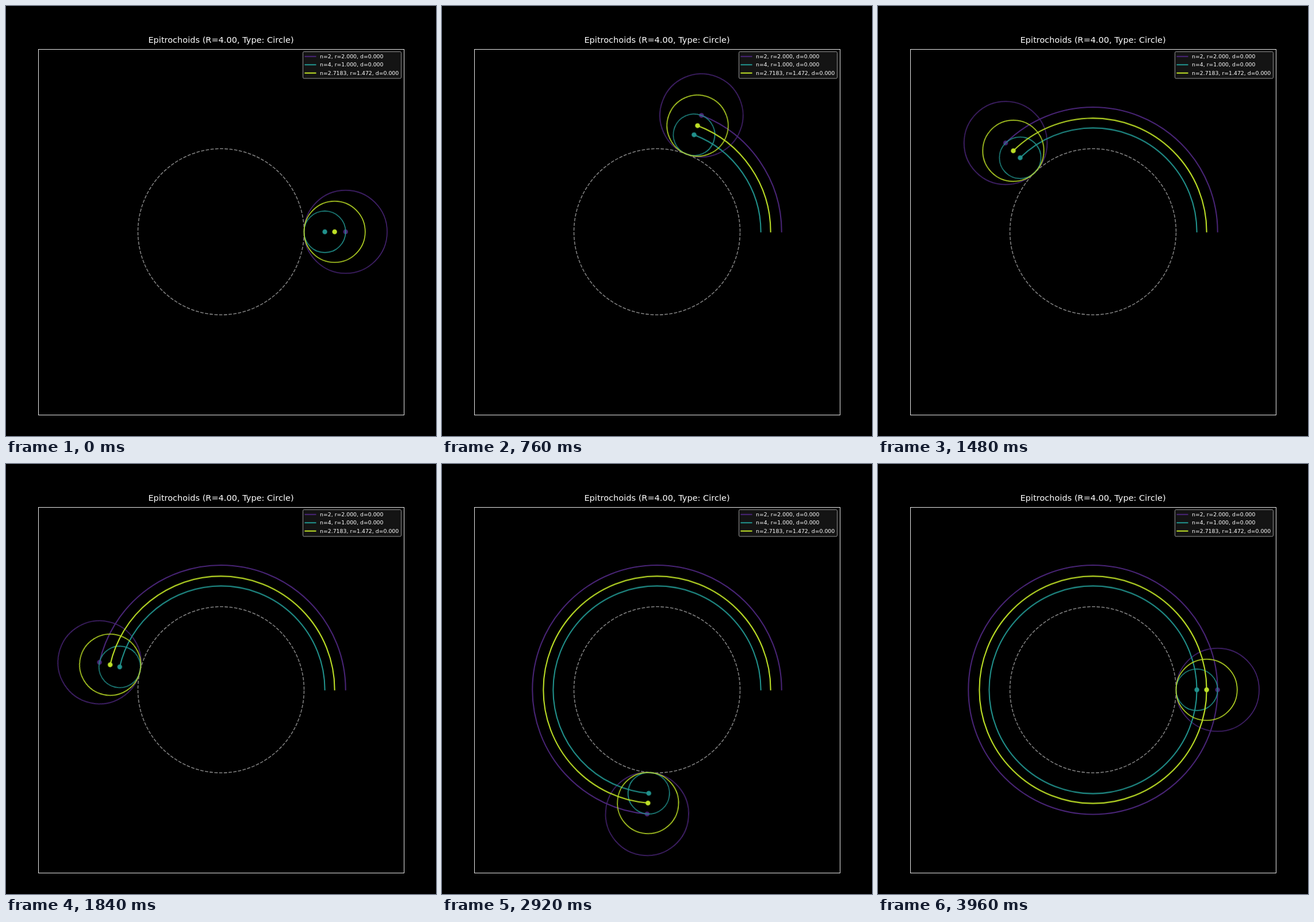
Write an HTML page that moves like this. It is 748 px wide and 748 px high and loops after 4 s.

```html
<!DOCTYPE html>
<html lang="en">
<head>
<meta charset="utf-8">
<title>Epitrochoids</title>
<style>
  html, body { margin: 0; width: 100%; height: 100%; overflow: hidden; background: #000; }
  svg { display: block; width: 748px; height: 748px; }
  text { fill: #fff; font-family: "DejaVu Sans", sans-serif; }
  .title { font-size: 14.54px; text-anchor: middle; }
  .legend text { font-size: 9.35px; }
  .legend line, .trail { stroke-width: 2.08; stroke-linecap: square; }
  .base, .wheel { fill: none; stroke-width: 1.56; }
  .base { stroke: #808080; stroke-dasharray: 5.77 2.49; }
  .trail { fill: none; stroke-dasharray: 1 2; }
  /* 100 poses, with both ends of the turn included */
  .trail, .arm { animation: 4s steps(100, jump-none) infinite; }
  .trail { animation-name: draw; }
  .arm { animation-name: turn; }
  @keyframes draw { from { stroke-dashoffset: 1; } to { stroke-dashoffset: 0; } }
  @keyframes turn { from { transform: rotate(0deg); } to { transform: rotate(360deg); } }
</style>
</head>
<body>
<svg viewBox="0 0 748 748">
  <rect width="748" height="748"/>
  <g id="plot" transform="translate(374 392.75) scale(1 -1)">
    <circle class="base" r="144.5"/>
  </g>
  <rect x="56.5" y="75.5" width="636" height="636" fill="none" stroke="#fff" stroke-width=".9"/>
  <text class="title" x="374" y="64.3">Epitrochoids (R=4.00, Type: Circle)</text>
  <g class="legend" id="legend">
    <rect x="516.5" y="79.5" width="171" height="46.5" rx="1.9" fill="#141414" stroke="#a3a3a3" stroke-width=".9"/>
  </g>
</svg>
<script>
  const UNIT = 36.125, R = 4;
  const curves = [
    { n: 2, label: "2", color: "#482475" },
    { n: 4, label: "4", color: "#21918c" },
    { n: Math.E, label: "2.7183", color: "#bddf26" }
  ];
  const plot = document.getElementById("plot");
  const legend = document.getElementById("legend");

  curves.forEach(({ n, label, color }, i) => {
    const r = R / n;
    const orbit = (R + r) * UNIT;
    const y = 87.8 + i * 14.4;
    plot.insertAdjacentHTML("beforeend", `
      <circle class="trail" r="${orbit}" pathLength="1" stroke="${color}"/>
      <g class="arm">
        <circle class="wheel" cx="${orbit}" r="${r * UNIT}" stroke="${color}"/>
        <circle cx="${orbit}" r="4.2" fill="${color}"/>
      </g>`);
    legend.insertAdjacentHTML("beforeend", `
      <line x1="520.5" x2="538.5" y1="${y}" y2="${y}" stroke="${color}"/>
      <text x="546" y="${y + 3}">n=${label}, r=${r.toFixed(3)}, d=0.000</text>`);
  });
</script>
</body>
</html>
```
